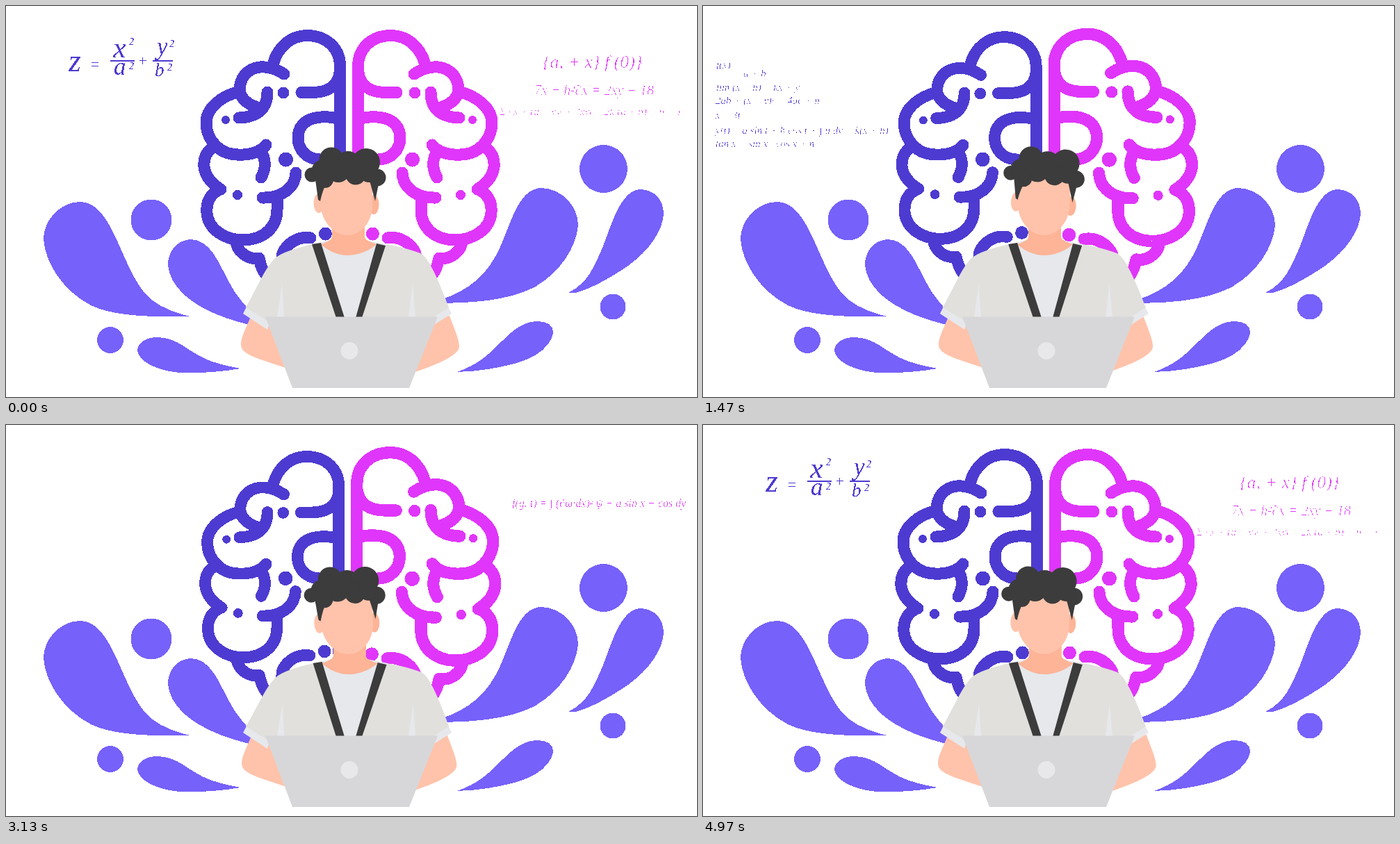
These frames come from a looping animation (994 px wide and 563 px high, 5.01 s). An HTML page:

```html
<!DOCTYPE html>
<html lang="en">
<head>
<meta charset="utf-8">
<title>Thinking</title>
<style>
  html, body { margin: 0; width: 100%; height: 100%; overflow: hidden; background: #fff; }
  svg { display: block; }
  text { font: italic 15px "Liberation Serif", "Noto Serif", serif; }
  .half { fill: none; stroke: currentColor; stroke-width: 17; stroke-linecap: round; stroke-linejoin: round; }
  .half circle { fill: currentColor; stroke: none; }
  .indigo { color: #4d3bd1; }
  .pink { color: #e036fb; }
  #notes g { fill: currentColor; }
  .skin { fill: #ffc3ab; }
  .shade { fill: #fdb497; }
  .dark { fill: #3c3c3c; }
  .shirt { fill: #e1e0dc; }
  .tee { fill: #e6e8ec; }
</style>
</head>
<body>
<svg width="994" height="563" viewBox="0 0 994 563">
  <defs>
    <!-- hard edge: thin, faint strokes break up while fading -->
    <filter id="hard" filterUnits="userSpaceOnUse" x="0" y="0" width="994" height="563" color-interpolation-filters="sRGB">
      <feComponentTransfer><feFuncA type="discrete" tableValues="0 1"/></feComponentTransfer>
    </filter>
    <g id="half" class="half">
      <path d="M384 84C392 56 412 42.500 433 42.500C462 42.500 480.500 62 480.500 86V332"/>
      <path d="M480 96C478 114 464 124.500 440 124.500H425"/>
      <path d="M400 98C388 90 376 87 365 88C347 90 336 104 336 121C338 135 349 142 362 146"/>
      <path d="M376 124C376 146 364 160 335 161"/>
      <path d="M336 123C308 130 288 148 288 168C288 184 296 196 304 203C312 211 325 215 342 214C358 213 368 208 374 200"/>
      <path d="M366 208C375 222 374 234 367 247"/>
      <path d="M299 203C288 209 284 220 285 232C287 246 296 256 309 264"/>
      <path d="M306 265C292 272 288 284 289 298C291 322 315 337 342 337C372 336 390 318 390 293V279"/>
      <path d="M369 276C396 277 416 262 417 240"/>
      <path d="M331 339C332 352 346 366 364 363C366 372 368 380 376 390"/>
      <path d="M438 334C420 331 404 342 398 356L396 372"/>
      <path d="M480 163C462 157 420 156 420 190C420 206 432 221 452 221"/>
      <circle cx="399" cy="125" r="8.500"/>
      <circle cx="316" cy="164" r="6"/>
      <circle cx="402.500" cy="221" r="10.500"/>
      <circle cx="333" cy="272" r="7"/>
      <circle cx="459.500" cy="328" r="9.500"/>
    </g>
  </defs>

  <g fill="#7661fa" shape-rendering="crispEdges">
    <path d="M265 447C235 440 213 429 200 414C177 387 164 340 146 311C132 288 119 282 105 282C78 283 54 308 54 335C56 370 82 410 122 431C155 447 210 448 265 447Z"/>
    <path d="M380 466C352 440 335 425 320 396C305 368 294 337 266 336C246 337 233 353 233 373C236 410 278 441 346 458Z"/>
    <path d="M337 522C300 515 285 509 265 496C248 484 235 477 217 477C202 477 189 485 189 496C192 513 218 525 250 528C285 529 315 526 337 522Z"/>
    <path d="M610 428C653 415 683 399 705 359C725 322 734 263 770 262C800 263 823 288 823 316C820 350 795 385 760 405C720 425 670 428 610 428Z"/>
    <path d="M809 413C838 398 846 375 858 348C870 318 884 264 913 264C934 265 946 280 946 300C944 325 925 352 895 374C870 391 840 408 819 413Z"/>
    <path d="M649 527C685 514 697 498 714 482C730 466 745 454 765 454C780 454 788 461 787 471C784 489 765 505 735 514C705 522 680 526 649 527Z"/>
    <circle cx="209" cy="308" r="29.500"/>
    <circle cx="150" cy="481" r="19"/>
    <circle cx="859.500" cy="234.500" r="34.500"/>
    <circle cx="873" cy="433" r="18.500"/>
  </g>

  <g shape-rendering="crispEdges">
    <g id="left" class="indigo"><use href="#half"/></g>
    <g id="right" class="pink"><use href="#half" transform="translate(987) scale(-1 1)"/></g>
  </g>

  <g id="notes" filter="url(#hard)">
    <g id="fraction" class="indigo">
      <text x="90" y="95" style="font-size:46px">z</text>
      <text x="120" y="93" style="font-size:23px">=</text>
      <text x="154" y="75" style="font-size:42px">x</text>
      <text x="177" y="57" style="font-size:14px">2</text>
      <path d="M150 79H185V81H150ZM211 79H240V81H211Z"/>
      <text x="155" y="100" style="font-size:35px">a</text>
      <text x="177" y="92" style="font-size:14px">2</text>
      <text x="189" y="87" style="font-size:22px">+</text>
      <text x="217" y="71" style="font-size:35px">y</text>
      <text x="235" y="60" style="font-size:14px">2</text>
      <text x="214" y="102" style="font-size:27px">b</text>
      <text x="232" y="94" style="font-size:14px">2</text>
    </g>
    <g id="series" class="pink">
      <text x="772" y="71" style="font-size:26px">{a, + x} f (0)}</text>
      <text x="760" y="110" style="font-size:20px">7x + h²∂x = 2xy − 18</text>
      <text x="710" y="139">Σ ∂x + (u − v)² + 3xyt + 2k/(a + b) = n − 1</text>
    </g>
    <g id="proof" class="indigo">
      <text x="19" y="90">f(x)</text>
      <text x="58" y="102">a + b</text>
      <text x="19" y="122">lim (x − h) = kx + y</text>
      <text x="18" y="141">2ab + (x − y)² = 4ac + n</text>
      <text x="18" y="162">x = 3t</text>
      <text x="18" y="184">y(t) = a sin t + b cos t + ∫ u dv − k(x + h)</text>
      <text x="18" y="203">tan x = sin x / cos x + n</text>
    </g>
    <g id="integral" class="pink">
      <text x="728" y="118" style="font-size:16px">f(g, t) = ∫ (∂ω·dx)² ψ + a sin x − cos dy</text>
    </g>
  </g>

  <path id="armL" class="skin" d="M352 447C345 465 337 478 338 489C340 501 355 506 412 524L400 470L376 455Z"/>
  <path id="armR" class="skin" d="M638 446C645 465 652 480 652 491C650 503 625 515 580 530L606 452Z"/>

  <g id="body">
    <path class="tee" d="M346 433L341 443L376 466L385 440ZM636 433L641 443L608 464L600 440Z"/>
    <path class="shirt" d="M441 343C415 349 396 355 386 364C372 378 358 412 345 434L377 454H606L637 434C621 392 608 362 596 356C580 350 560 345 546 343Z"/>
    <path class="tee" d="M397 400L390 448H400ZM585 400L579 448H589ZM440 343L467 337H517L547 343L510 448H478Z"/>
    <path class="shade" d="M469 312V333Q468 338 453 343C463 353 478 359 491 359C506 359 522 353 533 343Q517 338 516 333V312Z"/>
    <path class="dark" d="M440 343L453 341L487 449H475ZM533 342L546 345L512 449H503Z"/>
  </g>

  <g id="head">
    <ellipse class="skin" cx="450" cy="284" rx="7.500" ry="14"/>
    <ellipse class="shade" cx="529" cy="286" rx="7.500" ry="14"/>
    <path class="skin" d="M458 245L453 276V290C455 312 473 330 491 330C510 330 526 312 527 290V245Z"/>
    <g id="hair" class="dark">
      <path d="M445 250H464Q456 262 452 281L449 279ZM522 248L536 256L531 281L527 266Z"/>
    </g>
  </g>

  <path fill="#d7d7d9" d="M373 447.500H621L580 550H412Z"/>
  <circle cx="494" cy="496.500" r="12.500" fill="#e8e8ea"/>
</svg>
<script>
const LOOP = 5010, TAU = 2 * Math.PI;
const el = id => document.getElementById(id);
const set = (id, transform) => el(id).setAttribute('transform', transform);

// curls: x, y, radius
const curls = [[440, 243, 10.5], [454, 236, 14], [468, 221, 17.5], [492, 228, 19], [518, 225, 20],
  [534, 247, 12.5], [503, 243, 14.5], [478, 237, 17], [459, 250, 12], [522, 240, 14]];
el('hair').innerHTML += curls.map(([x, y, r]) => `<circle cx="${x}" cy="${y}" r="${r}"/>`).join('');

// id, time of peak, peak opacity, fade length, height offset at the peak
const notes = [['fraction', -40, 1, 1450, 1], ['series', 600, 0.72, 3600, -7],
  ['proof', 1620, 0.66, 4000, -6], ['integral', 3080, 0.68, 4000, 2]];

const scaleAt = (s, x, y) => `translate(${x} ${y}) scale(${s}) translate(${-x} ${-y})`;

function draw(now) {
  const t = now % LOOP, w = TAU * t / LOOP;

  const pulse = (1 - Math.cos(w)) / 2;
  set('left', scaleAt(1 - 0.02 * pulse, 382.5, 210));
  set('right', scaleAt(1 + 0.02 * pulse, 604.5, 210));

  const sway = 1.6 * Math.sin(2 * w);
  const skew = -Math.atan(sway / 105) * 360 / TAU;
  set('body', `translate(0 448) skewX(${skew}) translate(0 -448)`);
  set('head', `translate(${sway}) rotate(${3.3 * Math.sin(w)} 491 306)`);

  set('armL', `translate(${5 * Math.min(1, 0.8 * (1 - Math.cos(3 * w)))})`);
  set('armR', `translate(${-5 * Math.abs(Math.sin(w))})`);

  for (const [id, peak, max, fade, y] of notes) {
    const d = (t - peak + 1.5 * LOOP) % LOOP - LOOP / 2;
    set(id, `translate(0 ${y - 0.042 * d})`);
    el(id).setAttribute('opacity', Math.max(0, max - Math.abs(d) / fade));
  }
}

const start = performance.now();
(function tick() {
  draw(performance.now() - start);
  requestAnimationFrame(tick);
})();
</script>
</body>
</html>
```
